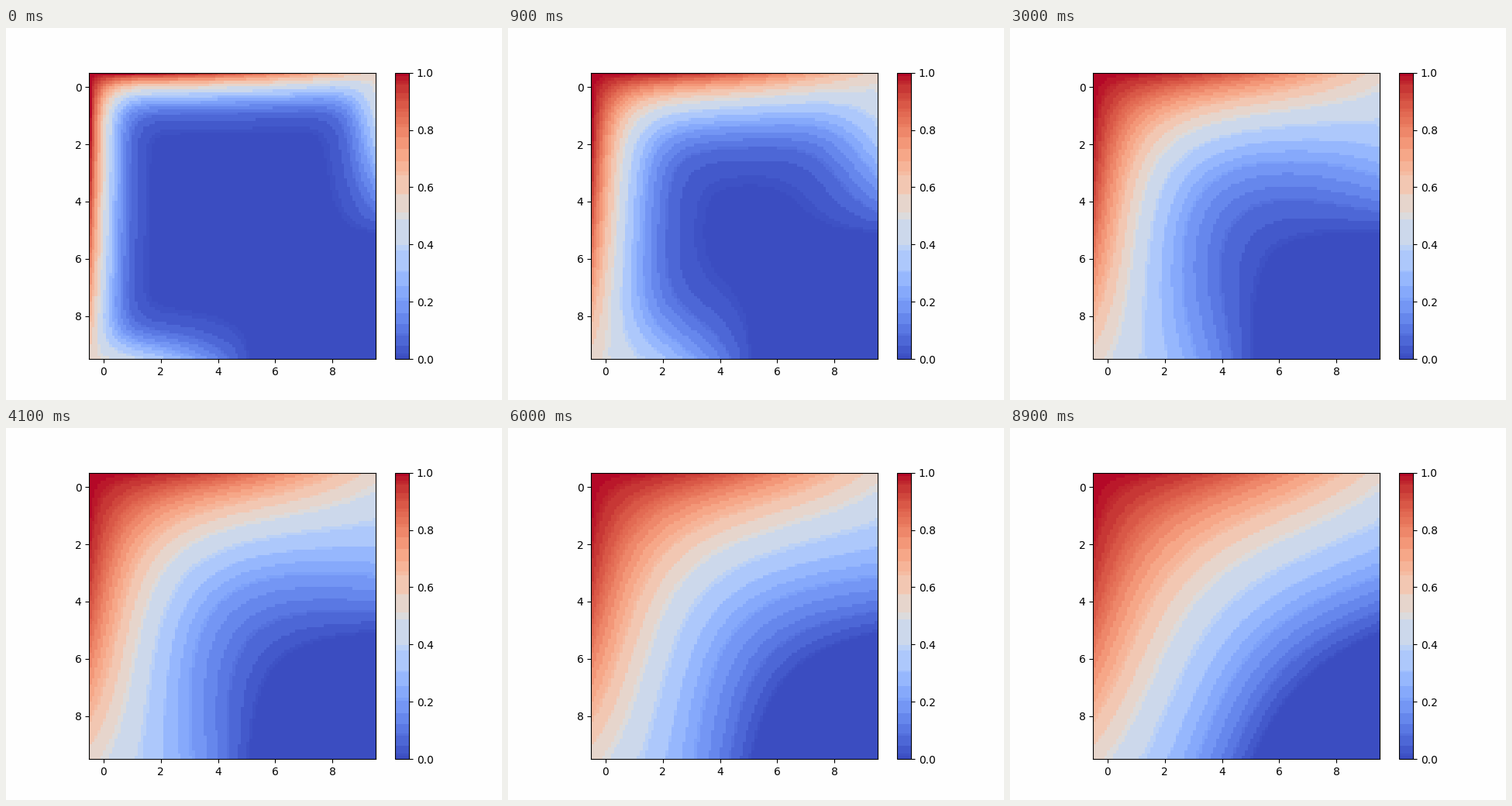
These frames come from a looping animation (640 by 480 pixels, 9 s). A matplotlib script:

```python
import numpy as np
import matplotlib.pyplot as plt
from matplotlib.animation import FuncAnimation
from matplotlib.colors import ListedColormap

N = 100            # grid cells per side
FRAMES = 90
R = 0.2            # diffusion number of one explicit step
FIRST = 175        # steps before the first picture
PER_FRAME = 48     # steps between pictures


def banded(name):
    """Merge colours that share a coarse RGB cell into their mean."""
    rgb = plt.get_cmap(name)(np.arange(256), bytes=True)[:, :3].astype(int)
    cells = rgb // [32, 16, 32]
    out = np.empty((256, 3))
    for cell in np.unique(cells, axis=0):
        same = (cells == cell).all(axis=1)
        out[same] = np.floor(rgb[same].mean(axis=0))
    return ListedColormap(out / 255)


def diffuse(u, steps):
    u = u.copy()
    for _ in range(steps):
        c = u[1:-1, 1:-1]
        c += R * (u[2:, 1:-1] + u[:-2, 1:-1] + u[1:-1, 2:] + u[1:-1, :-2] - 4 * c)
    return u


# Cold plate whose rim is held at cos(x + y)
s = np.linspace(0, 1, N)
start = np.cos(s[:, None] + s)
start[1:-1, 1:-1] = 0

fields = [diffuse(start, FIRST)]
while len(fields) < FRAMES:
    fields.append(diffuse(fields[-1], PER_FRAME))

fig, ax = plt.subplots(figsize=(6.4, 4.8), dpi=100, facecolor="#fefefe")
im = ax.imshow(fields[0], cmap=banded("coolwarm"), vmin=0, vmax=1,
               extent=(-0.5, 9.5, 9.5, -0.5), interpolation="nearest")
ax.set_xticks(range(0, 10, 2))
ax.set_yticks(range(0, 10, 2))
fig.colorbar(im, ax=ax)


def update(i):
    im.set_data(fields[i])
    return [im]


anim = FuncAnimation(fig, update, frames=FRAMES, interval=100,
                     repeat=True, repeat_delay=0)
plt.show()
```
